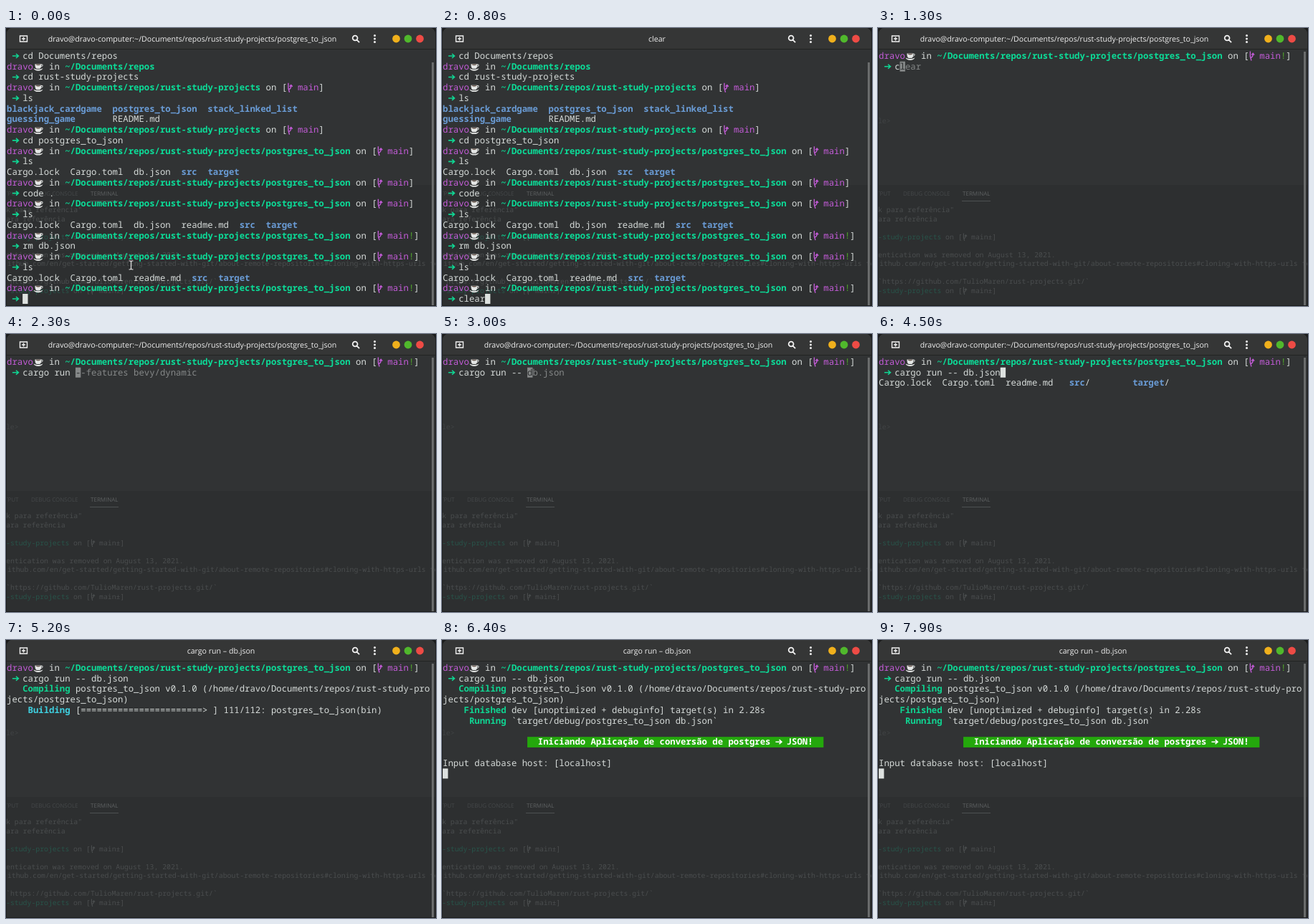
An HTML page with a canvas for the animation above (8 s loop, 600x388 px).

```html
<!DOCTYPE html>
<html lang="en">
<head>
<meta charset="utf-8">
<title>Terminal session</title>
<style>
html, body { margin: 0; width: 100%; height: 100%; overflow: hidden; background: #1a1b1b; }
canvas { display: block; }
</style>
</head>
<body>
<canvas id="stage" width="600" height="388"></canvas>
<script>
const LOOP = 8000, CELL = 7.38, ROW = 14.74;
const MONO = '"Noto Sans Mono", "DejaVu Sans Mono", monospace';
const SANS = '"Open Sans", "Noto Sans", sans-serif';
const ctx = document.getElementById('stage').getContext('2d');

// Style letters used in tagged lines: [colour, bold]
const STYLES = {
  w: ['#d6dbd9'], u: ['#c25bd6'], p: ['#0cdc98', 1], d: ['#6a9cd6', 1],
  g: ['#0fd592', 1], c: ['#3fd0e0', 1], x: ['#858888'], e: ['#4fa02c'], t: ['#ffffff', 1]
};
const ICONS = { k: cup, b: branch, a: arrow, r: (x, y) => arrow(x - 1, y, '#ffffff') };

const colX = col => 1 + col * CELL;
const baseY = row => 43 + row * ROW;

function text(str, x, y, color, font, align = 'left') {
  ctx.font = font;
  ctx.textRendering = 'geometricPrecision';
  ctx.textAlign = align;
  ctx.fillStyle = color;
  ctx.fillText(str, x, y);
}

function rect(x, y, w, h, color) {
  ctx.fillStyle = color;
  ctx.fillRect(x, y, w, h);
}

function dot(x, y, r, color) {
  ctx.fillStyle = color;
  ctx.beginPath();
  ctx.arc(x, y, r, 0, 7);
  ctx.fill();
}

function stroke(path, x, y, color, width) {
  ctx.save();
  ctx.translate(x, y);
  ctx.strokeStyle = color;
  ctx.lineWidth = width;
  ctx.stroke(new Path2D(path));
  ctx.restore();
}

function cup(x, y) {
  ctx.save();
  ctx.translate(x, y - 1.5);
  stroke('M10.5 -5 q3.5 -1 2.5 1.5 q-1 1.5 -3.5 1.5', 0, 0, '#d4d6d5', 1.1);
  ctx.fillStyle = '#e4e6e5';
  ctx.fill(new Path2D('M2.5 -6 H11.5 Q11.5 0 8.8 0.6 H5.2 Q2.5 0 2.5 -6 Z M0.5 0 Q7 3 13.5 0 Q12 3.4 7 3.4 Q2 3.4 0.5 0 Z'));
  ctx.fillStyle = '#6b5a50';
  ctx.fill(new Path2D('M3.2 -5.8 H10.8 Q10 -4 7 -4 Q4 -4 3.2 -5.8 Z'));
  ctx.restore();
}

function branch(x, y, color = STYLES.u[0], scale = 1) {
  ctx.save();
  ctx.translate(x, y);
  ctx.scale(scale, scale);
  stroke('M1.8 -10.5 V-3 L3.4 2.5 M2.6 -1.5 Q6 -3 5.6 -7 M3.6 -5.4 L5.6 -7.6 L7.6 -5.4', 0, 0, color, 1.4);
  ctx.restore();
}

function arrow(x, y, color = STYLES.g[0]) {
  stroke('M0.5 -4 H9 M5.6 -7 L9 -4 L5.6 -1', x, y, color, 1.6);
}

// Writes a line such as "<d>src<w>/"; returns the column after it.
function line(row, tagged, col = 0) {
  let style = 'w';
  tagged.split(/<(\w)>/).forEach((part, i) => {
    if (i % 2) { style = part; return; }
    if (!part) return;
    if (ICONS[style]) ICONS[style](colX(col), baseY(row));
    else {
      const [color, bold] = STYLES[style];
      text(part, colX(col), baseY(row), color, `${bold ? 'bold ' : ''}12.3px ${MONO}`);
    }
    col += part.length;
  });
  return col;
}

const REPOS = '~/Documents/repos';
const RUST = REPOS + '/rust-study-projects';
const PROJECT = RUST + '/postgres_to_json';

function prompt(path, dirty) {
  const git = path === REPOS ? ''
    : ` on [<b> <u> main${dirty ? '<e>!' : ''}<w>]`;
  return `<u>dravo<k>  <w> in <p>${path}<w>${git}`;
}
const cmd = str => ` <a> <w> ${str}`;

const HISTORY = [
  cmd('cd Documents/repos'), prompt(REPOS),
  cmd('cd rust-study-projects'), prompt(RUST),
  cmd('ls'),
  '<d>blackjack_cardgame  postgres_to_json  stack_linked_list',
  '<d>guessing_game<w>       README.md',
  prompt(RUST), cmd('cd postgres_to_json'),
  prompt(PROJECT), cmd('ls'),
  'Cargo.lock  Cargo.toml  db.json  <d>src  target',
  prompt(PROJECT), cmd('code .'),
  prompt(PROJECT), cmd('ls'),
  'Cargo.lock  Cargo.toml  db.json  readme.md  <d>src  target',
  prompt(PROJECT, 1), cmd('rm db.json'),
  prompt(PROJECT, 1), cmd('ls'),
  'Cargo.lock  Cargo.toml  readme.md  <d>src  target',
  prompt(PROJECT, 1)
];

function cursor(row, col, color = '#dde1df') {
  rect(colX(col), baseY(row) - 11, CELL, 14, color);
}

// Command line with the rest of the first matching suggestion in grey.
function input(row, typed, suggestions, showCursor = true) {
  const hint = typed && suggestions.find(s => s.startsWith(typed));
  const rest = hint ? hint.slice(typed.length) : '';
  const end = line(row, cmd(typed));
  line(row, '<x>' + rest, end);
  if (!showCursor) return;
  cursor(row, end, rest ? STYLES.x[0] : undefined);
  if (rest) text(rest[0], colX(end), baseY(row), '#2d2f30', `12.3px ${MONO}`);
}

const typedPart = (str, start, t) =>
  str.slice(0, Math.max(0, Math.floor((t - start) / 100) + 1));

// Editor window that shows faintly through the terminal
function backdrop() {
  rect(0, 0, 600, 388, '#313334');
  rect(0, 219, 600, 169, '#2d2f30');
  const dim = '#4a4d4e', green = '#28544a', tabColor = '#45484a';
  const ghost = (str, y, color = dim, x = 0) => text(str, x, y, color, `9.83px ${MONO}`);
  ghost('tle>', 133, '#414445', -6);
  const tab = (str, x, color) => text(str, x, 234, color, `8px ${SANS}`);
  tab('TPUT', -2, tabColor);
  tab('DEBUG CONSOLE', 35, tabColor);
  tab('TERMINAL', 118, '#5e6162');
  rect(117, 241, 40, 1, '#4e5152');
  ghost('k para referência"', 257);
  ghost('ara referência', 270);
  for (const y of [295, 370]) {
    ghost('-study-projects', y, green);
    ghost('on [', y, dim, 94);
    branch(118, y, dim, 0.8);
    ghost('main±]', y, dim, 130);
  }
  ghost('entication was removed on August 13, 2021.', 320);
  ghost('github.com/en/get-started/getting-started-with-git/about-remote-repositories#cloning-with-https-urls fo', 332, dim, -4);
  ghost('`https://github.com/TulioMaren/rust-projects.git/`', 357);
}

function header(title) {
  rect(0, 0, 600, 29, '#353636');
  rect(0, 29, 600, 1, '#222323');
  const long = title.length > 40;
  text(title, long ? 260 : 300, 18.5, '#f0f0f0', `500 10.6px ${SANS}`, 'center');
  stroke('M0 0 H10 V8 H0 Z M5 1.5 V6.5 M2.5 4 H7.5', 19.5, 11, '#f0f0f0', 1.4);
  stroke('M7 3.6 A3.4 3.4 0 1 0 0.2 3.6 A3.4 3.4 0 1 0 7 3.6 M6 6.2 L9.6 9.8', 483.5, 10.4, '#f0f0f0', 1.8);
  for (const y of [10.5, 15, 19.5]) dot(514.5, y, 1.5, '#f0f0f0');
  ['#f0b01c', '#50b82c', '#ee4b45'].forEach((c, i) => dot(544.5 + i * 16.5, 15, 5.4, c));
}

function typingStage(t) {
  line(0, prompt(PROJECT, 1));
  let typed = typedPart('cargo run ', 1300, t);
  for (const [at, key] of [[2600, '-'], [2800, '-'], [3000, ' ']]) if (t >= at) typed += key;
  typed += typedPart('db.json', 3800, t);
  input(1, typed,
    ['clear', 'cargo run --features bevy/dynamic', 'cargo run -- db.json'],
    t < 3600 || t >= 3800);
  if (t >= 3300) line(2, 'Cargo.lock  Cargo.toml  readme.md   <d>src<w>/        <d>target<w>/');
}

function runStage(t) {
  line(0, prompt(PROJECT, 1));
  line(1, cmd('cargo run -- db.json'));
  if (t < 4700) return;
  line(2, '   <g>Compiling<w> postgres_to_json v0.1.0 (/home/dravo/Documents/repos/rust-study-pro');
  line(3, 'jects/postgres_to_json)');
  if (t < 5500) {
    line(4, `    <c>Building<w> [${'='.repeat(23)}> ] 111/112: postgres_to_json(bin)`);
    return;
  }
  line(4, '    <g>Finished<w> dev [unoptimized + debuginfo] target(s) in 2.28s');
  line(5, '     <g>Running<w> `target/debug/postgres_to_json db.json`');
  if (t < 5600) return;
  rect(colX(16), baseY(7) - 11, CELL * 56, ROW, '#24a80c');
  line(7, '<t>Iniciando Aplicação de conversão de postgres <r> <t> JSON!', 18);
  line(9, 'Input database host: [localhost]');
  if ((t - 250) % 1200 < 600) cursor(10, 0);
}

function draw() {
  const t = performance.now() % LOOP;
  rect(0, 0, 600, 388, '#1a1b1b');
  ctx.save();
  ctx.beginPath();
  ctx.roundRect(1, 0, 598, 387, [8, 8, 0, 0]);
  ctx.clip();

  backdrop();
  header(t >= 4600 ? 'cargo run – db.json'
    : t >= 800 && t < 1000 ? 'clear'
    : 'dravo@dravo-computer:' + PROJECT);
  const top = t < 900 ? 48 : 33;
  rect(594, top, 3, 388 - top, '#6a6c6c');

  if (t < 900) {
    HISTORY.forEach((str, row) => line(row, str));
    input(23, typedPart('clear', 300, t), ['code .', 'clear']);
    if (t < 300) stroke('M-3 -6 H-1 L0 -5 L1 -6 H3 M0 -5 V5 M-3 6 H-1 L0 5 L1 6 H3', 174.5, 331, '#e8e8e8', 1.2);
  } else if (t < 1000) cursor(0, 0);
  else if (t < 4600) typingStage(t);
  else runStage(t);

  ctx.restore();
  requestAnimationFrame(draw);
}
draw();
</script>
</body>
</html>
```
